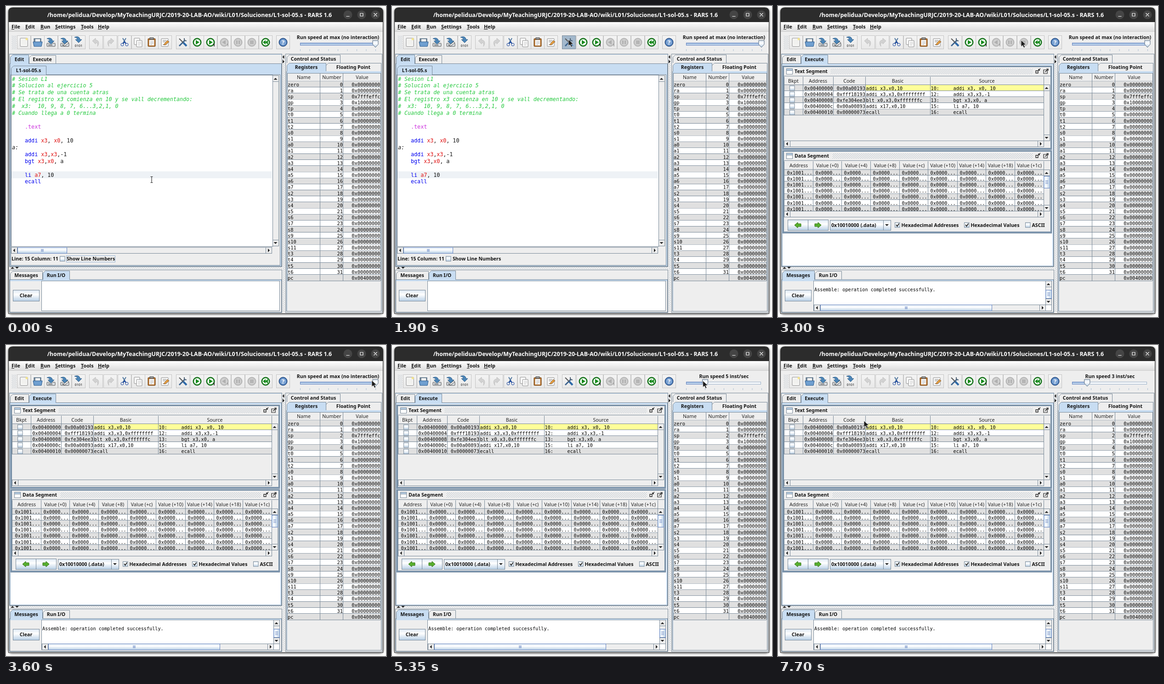
Write an HTML page that moves like this. It is 827 px wide and 677 px high and loops after 8000 ms.

```html
<!DOCTYPE html>
<html lang="es">
<head>
<meta charset="utf-8">
<title>RARS</title>
<style>
html, body { margin: 0; width: 100%; height: 100%; overflow: hidden; background: #fff; }
svg { display: block; }
text { font: 10.6px 'Noto Sans', 'Open Sans', sans-serif; white-space: pre; fill: #222; }
.b { font-weight: 700; fill: #111; }
.m { font: 10.2px 'DejaVu Sans Mono', monospace; fill: #000; }
.n { font: 10.35px 'DejaVu Sans Mono', monospace; fill: #000; }
.c { font: 11.67px 'DejaVu Sans Mono', monospace; fill: #111; }
.title { font-size: 12.45px; font-weight: 700; fill: #fff; }
.mid { text-anchor: middle; }
.end { text-anchor: end; }
.u { text-decoration: underline; }
</style>
</head>
<body>
<svg id="stage" width="827" height="677" viewBox="0 0 827 677">
<defs>
  <linearGradient id="menu" x2="0" y2="1"><stop stop-color="#fff"/><stop offset="1" stop-color="#dcdcdc"/></linearGradient>
  <linearGradient id="btn" x2="0" y2="1"><stop stop-color="#f4f4f4"/><stop offset="1" stop-color="#e8e8e8"/></linearGradient>
  <linearGradient id="blue" x2="0" y2="1"><stop stop-color="#dde8f3"/><stop offset=".4" stop-color="#fff"/><stop offset="1" stop-color="#b8cfe5"/></linearGradient>
  <linearGradient id="thumbV"><stop stop-color="#c8ddf2"/><stop offset=".35" stop-color="#fff"/><stop offset="1" stop-color="#b8cfe5"/></linearGradient>
  <linearGradient id="track" x2="0" y2="1"><stop stop-color="#8fb0d8"/><stop offset="1" stop-color="#d5e4f4"/></linearGradient>
  <radialGradient id="green"><stop stop-color="#4fc04f"/><stop offset="1" stop-color="#117a17"/></radialGradient>
  <pattern id="bump" width="4" height="4" patternUnits="userSpaceOnUse">
    <path d="M0 0h1v1h-1zM2 2h1v1h-1z" fill="#fff"/><path d="M1 1h1v1h-1zM3 3h1v1h-1z" fill="#8796a5"/>
  </pattern>
  <filter id="soft"><feGaussianBlur stdDeviation="2"/></filter>
  <clipPath id="dataClip"><rect x="13" y="356" width="566" height="90"/></clipPath>
</defs>
</svg>
<script>
const LINE = '#7a8a99', BLUE = '#c8ddf2', BG = '#eee', GRAY = '#e0e0e0';

const rect = (x, y, w, h, fill, stroke = 'none', more = '') =>
  `<rect x="${x}" y="${y}" width="${w}" height="${h}" fill="${fill}" stroke="${stroke}" ${more}/>`;
const box = (x, y, w, h, fill, stroke = LINE) => rect(x + .5, y + .5, w, h, fill, stroke);
const path = (d, fill = 'none', stroke = 'none', w = 1) =>
  `<path d="${d}" fill="${fill}" stroke="${stroke}" stroke-width="${w}"/>`;
const circle = (x, y, r, fill, stroke = 'none') => `<circle cx="${x}" cy="${y}" r="${r}" fill="${fill}" stroke="${stroke}"/>`;
const text = (x, y, s, cls = '', more = '') => `<text x="${x}" y="${y}" class="${cls}" ${more}>${s}</text>`;
const group = (body, attrs = '') => `<g ${attrs}>${body}</g>`;
const times = (n, f) => Array.from({ length: n }, (_, i) => f(i)).join('');
const hline = (x1, x2, y, c = LINE) => rect(x1, y, x2 - x1, 1, c);
const vline = (x, y1, y2, c = LINE) => rect(x, y1, 1, y2 - y1, c);

const tab = (x, y, w, h, s, on) =>
  path(`M${x + .5} ${y + h}V${y + 5.5}l5 -5H${x + w + .5}V${y + h}`, on ? BLUE : BG, LINE) +
  text(x + w / 2, y + h / 2 + 4.3, s, 'b mid');

const tri = (x, y, dir) => path({
  u: `M${x - 4} ${y + 2}h8l-4 -4z`, d: `M${x - 4} ${y - 2}h8l-4 4z`,
  l: `M${x + 2} ${y - 4}v8l-4 -4z`, r: `M${x - 2} ${y - 4}v8l4 -4z`
}[dir], '#222');

function vbar(x, y, h, pos, len) {
  let s = box(x, y, 13, h, BG) + hline(x, x + 13, y + 13) + hline(x, x + 13, y + h - 13) +
    tri(x + 6.5, y + 7.5, 'u') + tri(x + 6.5, y + h - 6, 'd');
  if (len) s += box(x, pos, 13, len, 'url(#thumbV)', '#6382bf') +
    times(3, i => hline(x + 4, x + 10, pos + len / 2 - 3 + i * 3, '#6382bf'));
  return s;
}
function hbar(x, y, w, pos, len) {
  let s = box(x, y, w, 13, BG) + vline(x + 13, y, y + 13) + vline(x + w - 13, y, y + 13) +
    tri(x + 6.5, y + 7, 'l') + tri(x + w - 6, y + 7, 'r');
  if (len) s += box(pos, y, len, 13, 'url(#blue)', '#6382bf') +
    times(3, i => vline(pos + len / 2 - 2 + i * 2, y + 4, y + 10, '#6382bf'));
  return s;
}
const check = (x, y, on) => box(x, y, 10.5, 10.5, 'url(#blue)') +
  (on ? path(`M${x + 3} ${y + 5}l2.4 3.4l4 -6`, 'none', '#222', 1.8) : '');

// toolbar
const ink = '#bdbdbd';
const page = (x, y, w, h) => rect(x, y, w, h, '#fdfdfd', '#888', 'rx="1"');
const drive = rect(-9, 2, 18, 7, '#d8dde2', '#555', 'rx="1"') + path('M-6 6h9', 'none', '#555', 1.5);
const swoop = path('M-9 -8C-2 -11 3 -8 3 -3H7L0 4L-7 -3H-3C-3 -6 -5 -7 -9 -8z', '#4c86b8', '#1f4f7d', .8);
const undo = path('M-8 -3L-1 -9V-5C6 -5 8 2 3 9C4 3 3 1 -1 1V4z', '#d2d2d2', '#bbb', .8);
const disc = fill => circle(0, 0, 9, fill, fill == ink ? '#b0b0b0' : '#0b5a10') + circle(0, 0, 6.8, fill == ink ? '#d2d2d2' : '#fff');
const one = c => text(5, 9, '1', 'b', `style="font-size:9px;fill:${c}"`);
const play = disc('url(#green)') + path('M-3 -5L5 0L-3 5z', '#168a1c');
const icons = [
  [39, page(-8, -9, 16, 18) + rect(-6, -7, 12, 13, '#f1f1ef') + circle(6, -7, 2.5, '#f5e58c')],
  [69, rect(-8, -8, 15, 14, '#7d8fa0', '#37556f') + path('M-5 -7h10v8h-10z', '#f2f2f2') + path('M-10 -1H10L8 9H-8z', '#6f9fd0', '#28588c')],
  [98, drive + swoop],
  [128, drive + swoop + path('M-4 7L6 -1L9 1L0 8z', '#eee', '#333', .8)],
  [158, group(swoop, 'transform="translate(0 -3)"') + text(0, 10, '0101', 'mid', 'style="font-size:7.5px;fill:#111"')],
  [196, undo],
  [227, group(undo, 'transform="scale(-1 1)"')],
  [258, path('M-4 -9L3 3M3 -9L-4 3', 'none', '#51789f', 2) + circle(-5, 5, 3, 'none', '#14409c') + circle(5, 5, 3, 'none', '#14409c') + path('M-3 3L0 -1L3 3', 'none', '#14409c', 2)],
  [288, page(-9, -9, 12, 14) + page(-4, -4, 12, 14) + path('M-1 0h7M-1 3h7M-1 6h5', 'none', '#bbb')],
  [317, rect(-8, -8, 16, 17, '#b8722c', '#6b3d0c', 'rx="1"') + rect(-5.5, -5, 11, 12, '#f8f8f8') + rect(-4, -10, 8, 4, '#999', '#444') + path('M-3 -1h7M-3 2h7M-3 5h4', 'none', '#aaa')],
  [346, page(-8, -8, 15, 17) + path('M-5 -4h8M-5 -1h6M-5 5h9', 'none', '#777') + path('M-3 5L5 -4L9 -1L0 6z', '#e8a040', '#704010', .8)],
  [385, path('M-8 8L5 -5', 'none', '#3f6690', 3) + path('M3 -9L3 -4L8 -3', 'none', '#567', 2) + path('M-8 -8L1 1', 'none', '#555', 2) + path('M1 1L8 8', 'none', '#2d69a8', 4)],
  [416, play],
  [445, play + one('#111')],
  [475, disc(ink) + path('M3 -5L-5 0L3 5z', '#b0b0b0') + one('#999')],
  [505, disc(ink) + path('M-2.5 -4v8M2.5 -4v8', 'none', '#aaa', 2.5)],
  [535, disc(ink) + rect(-4, -4, 8, 8, '#b5b5b5')],
  [565, disc('url(#green)') + path('M0 -5L-6 0L0 5zM5 -5L-1 0L5 5z', '#168a1c')],
  [603, circle(0, 0, 9, '#3e6fae', '#1e3f70') + circle(0, 0, 7, '#7da4d4') + text(0, 4.8, '?', 'b mid', 'style="font-size:13px;fill:#fff"')]
];
const button = ([x, body]) => box(x - 15, 64, 29, 29, 'url(#btn)', '#c4c4c4') + group(body, `transform="translate(${x} 79)"`);

function chrome() {
  const title = '/home/pelidua/Develop/MyTeachingURJC/2019-20-LAB-AO/wiki/L01/Soluciones/L1-sol-05.s - RARS 1.6';
  const menus = [[12, 'File'], [42, 'Edit'], [75, 'Run'], [107, 'Settings'], [163, 'Tools'], [200, 'Help']];
  return rect(4, 4, 818, 668, '#000', 'none', 'rx="9" opacity=".5" filter="url(#soft)"') +
    path('M5 670V13Q5 3 15 3H811Q821 3 821 13V670z', '#2c2c2c') +
    rect(6, 35, 814, 634, BG) +
    text(399.5, 24, title, 'title mid') +
    [744, 774, 804].map(x => circle(x, 19, 9.5, '#454545')).join('') +
    path('M740.5 22.5h7M771 16h6v6h-6zM800.5 15.5l7 7m0 -7l-7 7', 'none', '#fff', 1.2) +
    rect(6, 35, 814, 20, 'url(#menu)') + hline(6, 820, 55, '#ccc') +
    menus.map(([x, s]) => text(x, 49, `<tspan class="u">${s[0]}</tspan>${s.slice(1)}`, 'b', 'style="font-size:10.8px"')).join('') +
    rect(13, 65, 9, 29, 'url(#bump)') + icons.map(button).join('');
}

function leftPane() {
  return box(7, 104, 593, 463, BG) + hline(8, 600, 105, '#b8cfe5') +
    rect(8, 125, 592, 441, BLUE) + box(8, 125, 591, 441, 'none') +
    rect(602, 105, 5, 562, 'url(#bump)') + tri(603.5, 111, 'l') + tri(604, 121, 'r') +
    rect(8, 568, 592, 5, 'url(#bump)') + tri(14, 570, 'u') + tri(24, 570, 'd') +
    box(7, 574, 593, 93, BG) + rect(8, 595, 592, 4, BLUE) + hline(8, 600, 595) +
    box(8, 595, 591, 71, 'none') + box(15, 618, 57, 24, 'url(#blue)') + text(43.5, 634, 'Clear', 'b mid') +
    box(77, 598, 518, 65, '#fff');
}

function registers() {
  const run = (p, a, b) => Array.from({ length: b - a + 1 }, (_, i) => p + (a + i));
  const names = ['zero', 'ra', 'sp', 'gp', 'tp', ...run('t', 0, 2), 's0', 's1', ...run('a', 0, 7), ...run('s', 2, 11), ...run('t', 3, 6), 'pc'];
  const values = { sp: '7fffeffc', gp: '10008000', pc: '00400000' };
  const h = 13.17, top = 164;
  return box(608, 104, 210, 563, BG) +
    tab(611, 106, 116, 18, 'Control and Status') + tab(696, 124, 120, 18, 'Floating Point') +
    tab(611, 124, 85, 18, 'Registers', true) +
    box(610, 142, 206, 522, BG) + rect(611, 142, 205, 4, BLUE) + vline(611, 142, 664, '#b8cfe5') +
    rect(612, 146, 203, 18, BG) + hline(612, 815, 146) + hline(612, 815, 163.5) +
    [[648, 'Name'], [709, 'Number'], [775, 'Value']].map(([x, s]) => text(x, 159, s, 'mid')).join('') +
    names.map((s, i) => {
      const y = top + i * h;
      return rect(612, y, 203, h, i % 2 ? '#fff' : GRAY) + hline(612, 815, Math.round(y + h) - 1) +
        text(613, y + 10.5, s, 'n') + (i < 32 ? text(733, y + 10.5, i, 'n end') : '') +
        text(814.5, y + 10.5, '0x' + (values[s] || '00000000'), 'n end');
    }).join('') +
    [612, 683, 733, 815].map(x => vline(x, 146, 598)).join('');
}

const source = `# Sesion L1
# Solucion al ejercicio 5
# Se trata de una cuenta atras
# El registro x3 comienza en 10 y se vall decrementando:
#  x3:  10, 9, 8, 7, 6...3,2,1, 0
# Cuando llega a 0 termina

    .text

    addi x3, x0, 10
a:
    addi x3,x3,-1
    bgt x3,x0, a

    li a7, 10
    ecall`.split('\n');

const paint = s => {
  const span = (c, w) => `<tspan fill="${c}">${w}</tspan>`;
  if (s[0] == '#') return `<tspan fill="#22c83c" font-style="italic">${s}</tspan>`;
  if (s == 'a:') return `<tspan font-style="italic">${s}</tspan>`;
  return s.replace(/addi|bgt|li|ecall|x\d|a7|\.text/g, w =>
    span(w == '.text' ? '#cc33dd' : /\d/.test(w) ? '#e01010' : '#0000f0', w));
};

function editScene() {
  return tab(50, 107, 58, 18, 'Execute') + tab(9, 106, 40, 20, 'Edit', true) +
    box(10, 149, 586, 415, BG) + tab(11, 130, 76, 20, 'L1-sol-05.s', true) +
    box(11, 150, 569, 373, '#fff') + rect(12, 360, 567, 15, '#eef2f6') +
    source.map((s, i) => text(13, 162.5 + i * 14.93, paint(s), 'c')).join('') +
    vbar(580, 151, 371) + hbar(11, 525, 567, 25, 107) +
    text(12, 554, 'Line: 15 Column: 11', 'b') + check(117, 544.5) + text(132, 554, 'Show Line Numbers', 'b') +
    tab(9, 577, 70, 18, 'Messages') + tab(80, 576, 58, 20, 'Run I/O', true);
}

function frame(y, h, s, dots) {
  const cy = y + 12;
  return rect(10, y, 586, h, '#869eb6') + box(10, y, 585, h - 1, 'none', '#5f7890') +
    rect(13, y + 3, 580, h - 7, BG) + box(12, y + 2, 581, h - 6, 'none', '#6f879e') +
    rect(dots, y + 6, 555 - dots, 13, 'url(#bump)') + text(36, cy + 3.6, s, 'b') +
    box(18, cy - 6, 13, 12, '#fff') + rect(19, cy - 5, 12, 3, '#b8cfe5') + hline(18, 31, cy - 2) +
    path(`M561 ${cy - 1}h5v5h-5zM571 ${cy - 6}l-4 4m0 -3v3h3`, 'none', '#222', 1.3) +
    path(`M578 ${cy - 3}h8v8h-8zM581 ${cy + 2}l7 -7m-4 0h4v4`, 'none', '#222', 1.2) + hline(13, 593, y + 22);
}

function textSegment() {
  const cols = [13, 54, 120, 190, 331, 578];
  const rows = [
    ['00a00193', 'addi x3,x0,10', '10:     addi x3, x0, 10'],
    ['fff18193', 'addi x3,x3,0xffffffff', '12:     addi x3,x3,-1'],
    ['fe304ee3', 'blt x0,x3,0xfffffffc', '13:     bgt x3,x0, a'],
    ['00a00893', 'addi x17,x0,10', '15:     li a7, 10'],
    ['00000073', 'ecall', '16:     ecall']
  ];
  return frame(130, 183, 'Text Segment', 115) +
    ['Bkpt', 'Address', 'Code', 'Basic', 'Source'].map((s, i) => text((cols[i] + cols[i + 1]) / 2, 166.5, s, 'mid')).join('') +
    hline(13, 579, 171) +
    rows.map(([code, basic, src], i) => {
      const y = 172 + i * 13.15;
      return rect(13, y, 565, 13.2, i % 2 ? '#fff' : GRAY) + (i ? '' : rect(190, y, 388, 13, '#ffff99')) +
        hline(13, 579, Math.round(y + 13.15) - 1) + check(25, Math.round(y) + 1) +
        text(119.5, y + 10.5, '0x004000' + (i * 4).toString(16).padStart(2, '0'), 'n end') +
        text(190, y + 10.5, '0x' + code, 'n end') + text(191.5, y + 10.5, basic, 'm') + text(332.5, y + 10.5, src, 'm');
    }).join('') +
    cols.map(x => vline(x, 154, 238)).join('') + vbar(578, 171, 122) + hbar(13, 293, 565);
}

function dataSegment() {
  const cols = [13, 76, 138, 201, 264, 326, 390, 452, 515, 578];
  const arrow = (x, k) => box(x, 465, 44, 23, 'url(#blue)') +
    group(path('M-7 0L0 -6V-3H7V3H0V6z', '#58b02e', '#2f6e12'), `transform="translate(${x + 22} 477) scale(${k} 1)"`);
  const heads = ['Address', ...['0', '4', '8', 'c', '10', '14', '18', '1c'].map(s => `Value (+${s})`)];
  const cells = times(7, i => {
    const y = 356 + i * 13.2;
    return rect(13, y, 565, 13.2, i % 2 ? '#fff' : GRAY) + hline(13, 579, Math.round(y + 13.2) - 1) +
      times(9, j => text(cols[j] + (j ? 5.5 : 6.5), y + 10.5, j ? '0x0000...' : '0x1001...', 'm'));
  });
  return frame(314, 181, 'Data Segment', 118) +
    heads.map((s, i) => text((cols[i] + cols[i + 1]) / 2 + .5, 351.2, s, 'mid')).join('') +
    group(cells, 'clip-path="url(#dataClip)"') + hline(13, 579, 355.5) +
    cols.map(x => vline(x, 338, 446)).join('') +
    vbar(578, 356, 90, 370, 26) + hbar(13, 446, 565) +
    arrow(21, 1) + arrow(65, -1) + box(113, 466, 132, 22, 'url(#blue)') + vline(229, 466, 488) + tri(237, 477, 'd') +
    text(116, 480.5, '0x10010000 (.data)', 'b') +
    [[254, 'Hexadecimal Addresses', 1], [405, 'Hexadecimal Values', 1], [538, 'ASCII', 0]]
      .map(([x, s, on]) => check(x, 471, on) + text(x + 14.5, 480.5, s, 'b')).join('');
}

function execScene() {
  return tab(9, 107, 40, 18, 'Edit') + tab(50, 106, 58, 20, 'Execute', true) +
    rect(10, 129, 587, 436, '#fff') + textSegment() + dataSegment() +
    tab(80, 577, 58, 18, 'Run I/O') + tab(9, 576, 70, 20, 'Messages', true) +
    text(79, 621, 'Assemble: operation completed successfully.', 'm') +
    vbar(582, 598, 52, 618, 18) + hbar(78, 650, 504, 92, 373);
}

const toolIcon = group(icons[11][1], 'transform="translate(385 79)"');
document.getElementById('stage').innerHTML += chrome() + leftPane() + registers() +
  group(editScene(), 'id="edit"') + group(execScene(), 'id="exec"') +
  group(box(131, 543, 106, 14, 'none', '#9db7d5'), 'id="focus"') +
  group(rect(370.5, 64.5, 29, 29, '#b8cfe5', LINE, 'id="toolBack"') + toolIcon, 'id="tool"') +
  text(722.5, 72, '', 'b mid', 'id="speed"') +
  box(640, 80, 162, 5, '#f4f7fa', '#9bb0c8') + rect(640.5, 80.5, 163, 5, 'url(#track)', '#6382bf', 'id="fill"') +
  times(9, i => vline(640 + i * 20.5, 94, 98, '#a9bdd3')) +
  group(path('M-6 -7.5H6V1L0 7.5L-6 1z', 'url(#blue)', '#56697d'), 'id="knob"') +
  group(path('M-2.5 -6.5H-.8L0 -6L.8 -6.5H2.5M0 -6V6M-2.5 6.5H-.8L0 6L.8 6.5H2.5', 'none', '#222', 1.1), 'id="beam"') +
  group(path('M0 0V14L3.4 11L6 16.4L8.6 15.2L6 10H10.8z', '#1c1c1c', '#fff', .7), 'id="arrow"');

// time, x, y, eased
const route = [
  [0, 317, 378], [600, 317, 378], [1300, 379, 152, 1], [1600, 379, 152], [1900, 384, 73, 1],
  [2650, 384, 73], [3500, 777, 77, 1], [3600, 796, 77], [3700, 799, 77], [3850, 799, 77],
  [4550, 731, 78], [5350, 676.5, 78], [5550, 671, 78], [5800, 663.7, 78], [6350, 663.7, 78],
  [6450, 664.7, 78], [6550, 664.7, 78], [6800, 668, 78], [7300, 668, 78], [7700, 187, 165, 1], [8000, 187, 165]
];

function pointer(t) {
  const i = route.findIndex(k => k[0] > t), [t0, x0, y0] = route[i - 1], [t1, x1, y1, eased] = route[i];
  let p = (t - t0) / (t1 - t0);
  if (eased) p = p * p * (3 - 2 * p);
  return [x0 + (x1 - x0) * p, y0 + (y1 - y0) * p];
}

const el = id => document.getElementById(id);
const show = (id, on) => el(id).setAttribute('visibility', on ? 'visible' : 'hidden');
const move = (id, x, y) => el(id).setAttribute('transform', `translate(${x} ${y})`);

function draw(t) {
  const [x, y] = pointer(t);
  const knob = t < 3850 ? 804 : t < 6800 ? x + 5 : 672.8;
  const step = Math.ceil((knob - 640) / 4.1 - .3);
  const label = 'Run speed ' + (step > 35 ? 'at max (no interaction)' : step - 5 + ' inst/sec');
  show('edit', t < 2100);
  show('exec', t >= 2100);
  show('focus', t < 1900);
  show('tool', t >= 1800 && t < 2750);
  el('toolBack').setAttribute('fill', t >= 1900 && t < 2100 ? '#a3b8cc' : 'url(#blue)');
  show('beam', t < 1650);
  show('arrow', t >= 1650);
  move('beam', x, y);
  move('arrow', x, y);
  move('knob', knob, 82.5);
  el('fill').setAttribute('width', knob - 641);
  if (el('speed').textContent != label) el('speed').textContent = label;
}

const start = performance.now();
function tick() {
  const t = (performance.now() - start) % 8000;
  draw(Math.floor(t / 50) * 50);
  requestAnimationFrame(tick);
}
tick();
</script>
</body>
</html>
```
